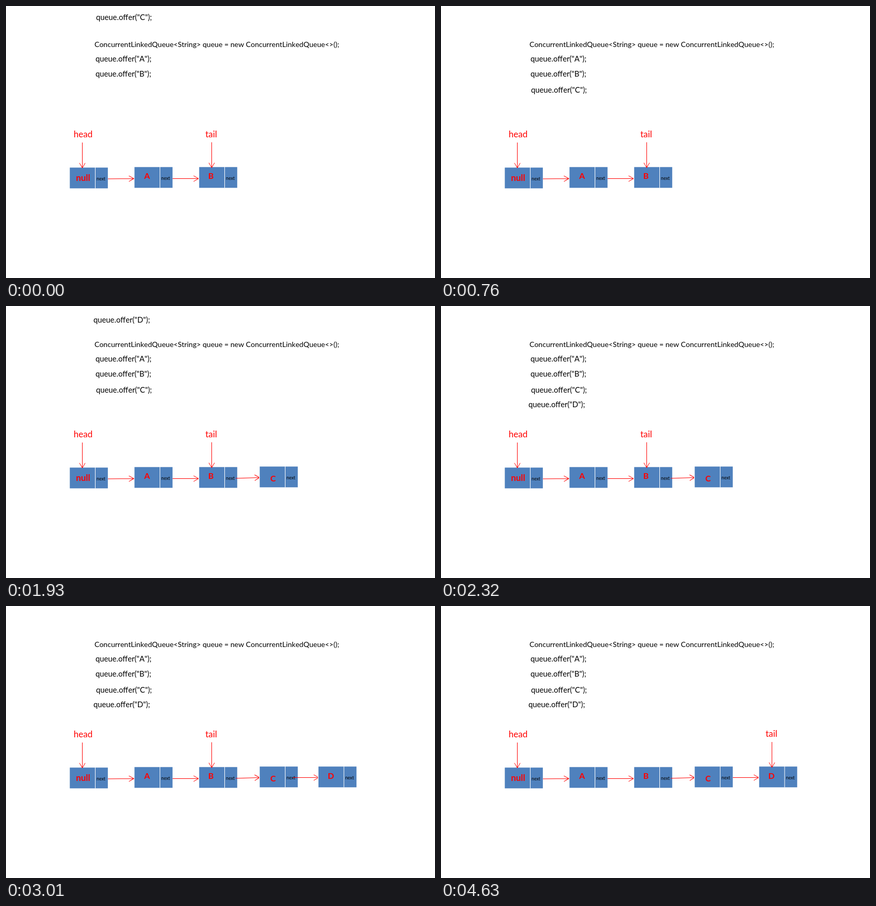
These frames come from a looping animation (829x524 px, 5260 ms). An HTML page with a canvas:

```html
<!DOCTYPE html>
<html lang="en">
<head>
<meta charset="utf-8">
<title>Linked queue</title>
<style>
  html, body { margin: 0; width: 100%; height: 100%; overflow: hidden; background: #fff; }
  canvas { display: block; }
</style>
</head>
<body>
<canvas id="stage" width="829" height="524"></canvas>
<script>
const ctx = document.getElementById('stage').getContext('2d');
const LOOP = 5260, STEP = 76.2;
const RED = '#f00', BLUE = '#4f81bd';
ctx.fontKerning = 'none';

function text(str, x, y, size, color, align = 'center', weight = 400) {
  ctx.font = `${weight} ${size}px Lato, Carlito, sans-serif`;
  ctx.textAlign = align;
  ctx.fillStyle = color;
  ctx.fillText(str, x, y);
}

const offer = (item, x, y) => text(`queue.offer("${item}");`, x, y, 14.8, '#000', 'left');

function arrow(x1, y1, x2, y2) {
  ctx.save();
  ctx.translate(x2, y2);
  ctx.rotate(Math.atan2(y2 - y1, x2 - x1));
  ctx.strokeStyle = RED;
  ctx.lineWidth = 1;
  ctx.beginPath();
  ctx.moveTo(-Math.hypot(x2 - x1, y2 - y1), 0);
  ctx.lineTo(0, 0);
  ctx.moveTo(-9.5, -5.5);
  ctx.lineTo(0, 0);
  ctx.lineTo(-9.5, 5.5);
  ctx.stroke();
  ctx.restore();
}

// Each part enters from the left edge, so it travels as far as its right side.
const slide = (right, p) => -right * (1 - p);

function rect(x, y, w, h, color) {
  ctx.fillStyle = color;
  ctx.fillRect(x, y, w, h);
}

function node(label, x, y, labelX, labelY, p = 1) {
  const left = x + slide(x + 74, p);
  rect(left - 1, y - 1, 76, 43, '#fff');
  rect(left + 0.3, y + 0.3, 73.5, 40, BLUE);
  rect(left + 49, y, 1, 40.5, '#fff');
  text(label, labelX + slide(labelX + 24, p), labelY, label.length > 1 ? 17 : 16, RED, 'center', 700);
  text('next', x + 60.5 + slide(x + 81, p), y + 24.7, 8.7, '#000');
}

function linkTo(x1, y1, x2, y2, p = 1) {
  const dx = slide(x2, p);
  arrow(x1 + dx, y1, x2 + dx, y2);
}

function pointer(label, labelX, tipX, y, p = 1) {
  text(label, labelX + slide(labelX + 20, p), y, 17, RED);
  const tip = tipX + slide(tipX + 6, p);
  arrow(tip, y + 10, tip, y + 59);
}

const stepAt = (t, start) => Math.floor((t - start) / STEP);

function draw(t) {
  const progress = (start, first) => Math.min(1, first + 0.131 * stepAt(t, start));

  rect(0, 0, 829, 524, '#fff');

  text('ConcurrentLinkedQueue<String> queue = new ConcurrentLinkedQueue<>();', 171, 79, 14.05, '#000', 'left');
  offer('A', 173, 107);
  offer('B', 173, 136);
  offer('C', 174, Math.min(167, 27 + 15 * (stepAt(t, 70) + 1)));
  if (t >= 1930) offer('D', 169, Math.min(195, 32 + 32.6 * stepAt(t, 1930)));

  node('null', 123, 311, 149, 337);
  node('A', 248, 310, 272.5, 333);
  node('B', 373, 310, 396, 333);
  linkTo(197, 333, 247, 332.5);
  linkTo(322, 332.5, 372, 332.5);
  pointer('head', 149, 147.5, 253);

  if (t >= 930) {
    const p = progress(930, 0.042);
    linkTo(444, 332, 490, 330.5, p);
    node('C', 490, 309, 516, 338, p);
  }
  if (t >= 2470) {
    const p = progress(2470, 0.067);
    linkTo(564, 330.5, 614, 330.5, p);
    node('D', 614.5, 309, 638.5, 332.5, p);
  }

  const faded = Math.max(0, stepAt(t, 3160) + 1) / 9;
  if (faded < 1) {
    ctx.globalAlpha = 1 - faded;
    pointer('tail', 396.5, 397.5, 252.5);
    ctx.globalAlpha = 1;
  }
  if (t >= 4020) pointer('tail', 638.5, 639.5, 252, progress(4020, 0.045));
}

function frame() {
  draw(performance.now() % LOOP);
  requestAnimationFrame(frame);
}
frame();
</script>
</body>
</html>
```
